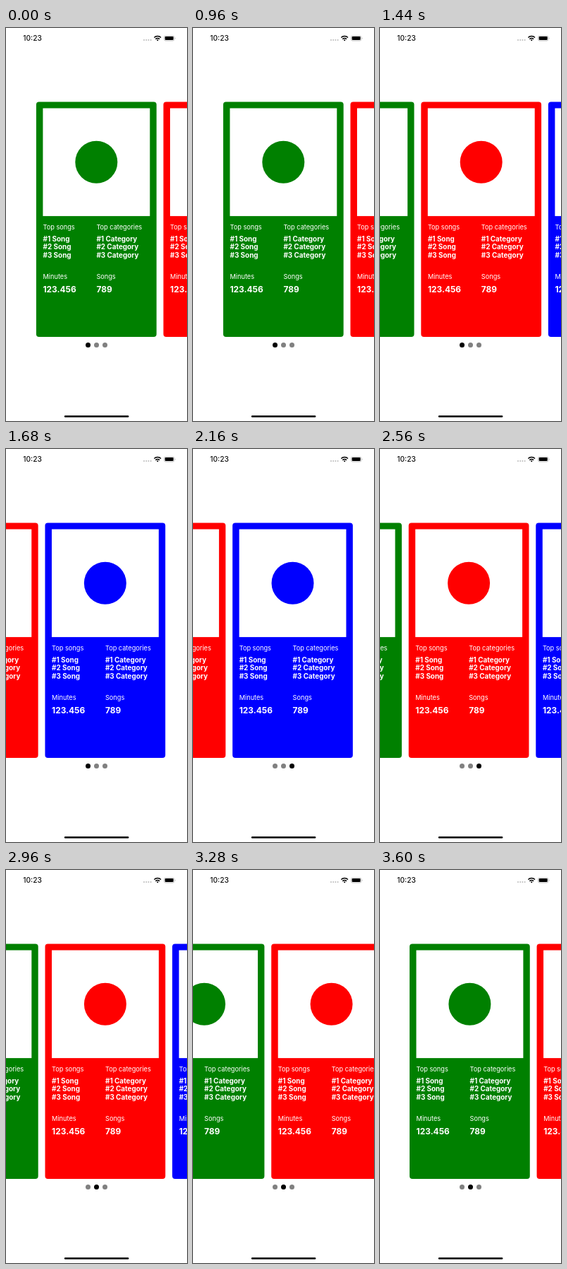
Write an HTML page that moves like this. It is 257x556 px and loops after 3.68 s.

```html
<!DOCTYPE html>
<html lang="en">
<head>
<meta charset="utf-8">
<title>Card carousel</title>
<style>
  html, body { margin: 0; width: 100%; height: 100%; overflow: hidden; background: #fff; }
  svg { display: block; width: 100%; height: 100%; font-family: Inter, "Liberation Sans", sans-serif; }
  .label { font-size: 9.2px; }
  .item { font-size: 9.9px; font-weight: 700; }
  .total { font-size: 11.9px; font-weight: 700; }
  .clock { font-size: 10.2px; font-weight: 500; }
</style>
</head>
<body>
<svg viewBox="0 0 257 556">
  <rect width="257" height="556" fill="#fff"/>
  <g id="track"></g>
  <g id="dots"></g>

  <text class="clock" x="24.3" y="18.2" fill="#111">10:23</text>
  <g fill="#bbb">
    <circle cx="196" cy="17" r="1"/><circle cx="199.2" cy="17" r="1"/>
    <circle cx="202.4" cy="17" r="1"/><circle cx="205.6" cy="17" r="1"/>
  </g>
  <g fill="none" stroke="#000" stroke-width="1.5">
    <path d="M210.4 13.6a6.7 6.7 0 0 1 9.6 0"/>
    <path d="M212.3 15.7a4.1 4.1 0 0 1 5.8 0"/>
  </g>
  <path d="M213.8 16.9a2 2 0 0 1 2.8 0L215.2 18.4Z"/>
  <rect x="224.6" y="11.1" width="14.2" height="7" rx="2" fill="none" stroke="#aaa" stroke-width=".7"/>
  <rect x="225.7" y="12.1" width="12" height="5" rx="1.1"/>
  <path d="M239.8 13.4a1.3 1.3 0 0 1 0 2.4Z" fill="#aaa"/>
  <rect x="82.8" y="548.2" width="91.6" height="2.5" rx="1.25"/>
</svg>
<script>
const LOOP = 3680, STEP = 80;
const PITCH = 180.6, CARD = 170.8, LEFT = 42.9;
const COLORS = ['#008000', '#ff0000', '#0000ff'];
const track = document.getElementById('track');
const dots = document.getElementById('dots');

const text = (cls, x, y, value) => `<text class="${cls}" x="${x}" y="${y}">${value}</text>`;

function column(x, title, item, totalTitle, total) {
  const items = [1, 2, 3].map(n => text('item', x, 289.9 + n * 11.7, `#${n} ${item}`));
  return text('label', x, 285, title) + items.join('') +
    text('label', x, 355.4, totalTitle) + text('total', x, 374.4, total);
}

function card(color, index) {
  return `<g transform="translate(${LEFT + index * PITCH} 0)" fill="#fff">
    <rect y="104.4" width="${CARD}" height="332.7" rx="4" fill="${color}"/>
    <rect x="9.5" y="113.5" width="151.9" height="152.6"/>
    <circle cx="${CARD / 2}" cy="189.8" r="30" fill="${color}"/>
    ${column(9.6, 'Top songs', 'Song', 'Minutes', '123.456')}
    ${column(85.5, 'Top categories', 'Category', 'Songs', '789')}
  </g>`;
}

track.innerHTML = COLORS.map(card).join('');
dots.innerHTML = COLORS.map((_, i) => `<circle cx="${116.5 + i * 12}" cy="448.4" r="3.5"/>`).join('');

// The distance left to a page shrinks by a fixed ratio each step.
const glide = (page, distance, ratio, elapsed) =>
  page * PITCH + distance * ratio ** (elapsed / STEP);

function scrollAt(t) {
  if (t < 1360) return 0;
  if (t < 1440) return 70;
  if (t < 1920) return glide(2, -196, 0.4, t - 1440);
  if (t < 2160) return 2 * PITCH;
  if (t < 2320) return 348;
  if (t < 2960) return glide(1, 74.4, 0.31, t - 2320);
  if (t < 3280) return 168;
  return glide(0, 112.3, 0.3, t - 3280);
}

const pageAt = t => t < 2160 ? 0 : t < 2960 ? 2 : 1;

function draw(time) {
  const t = Math.floor((time % LOOP) / STEP) * STEP;
  track.setAttribute('transform', `translate(${-scrollAt(t)} 0)`);
  [...dots.children].forEach((dot, i) =>
    dot.setAttribute('fill', i === pageAt(t) ? '#000' : '#808080'));
}

let start;
function tick(now) {
  start ??= now;
  draw(now - start);
  requestAnimationFrame(tick);
}
draw(0);
requestAnimationFrame(tick);
</script>
</body>
</html>
```
